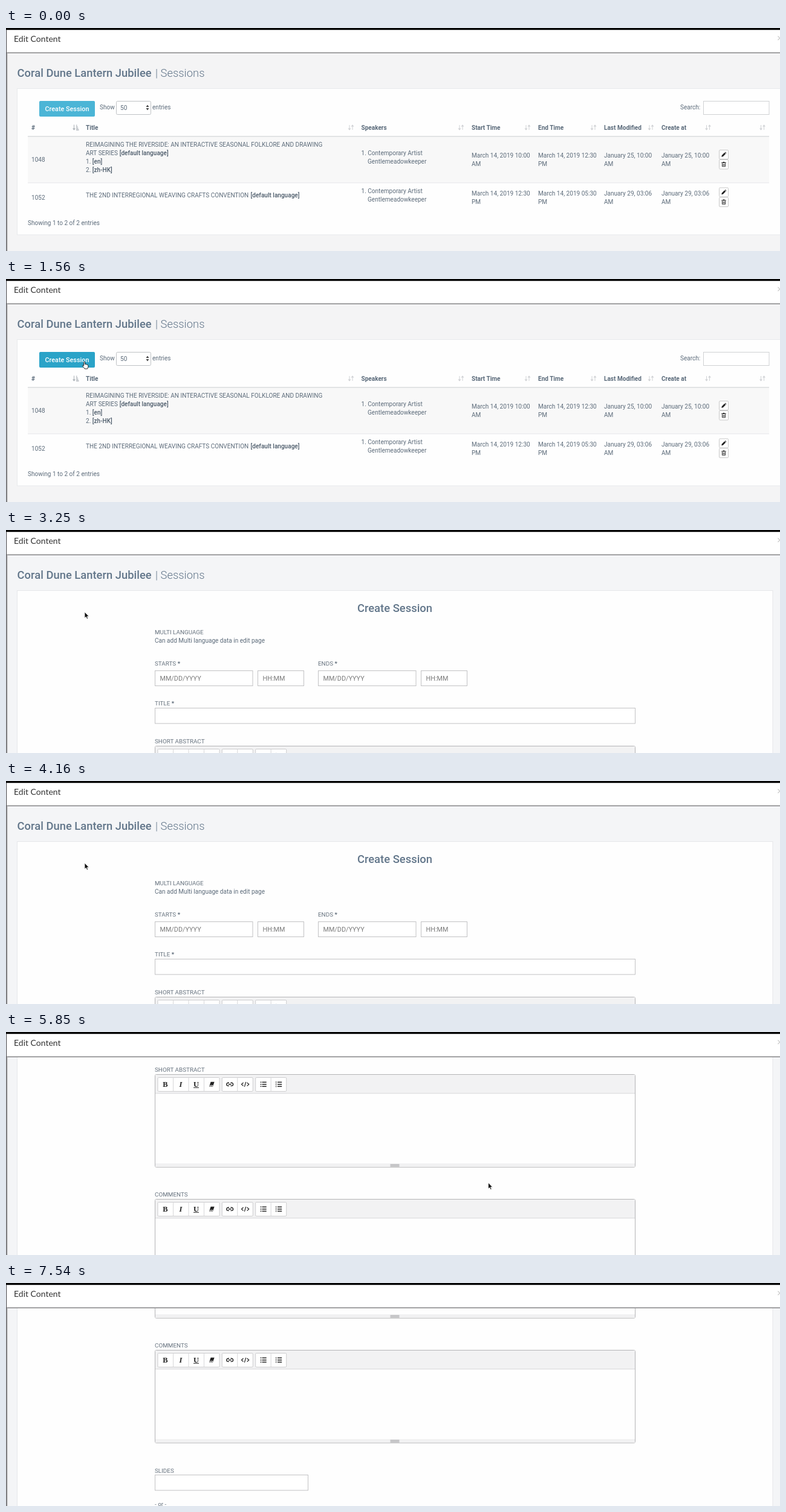
An HTML page for the animation above (8000 ms loop, 1280x370 px).

```html
<!DOCTYPE html>
<html lang="en">
<head>
<meta charset="utf-8">
<title>Sessions</title>
<style>
  html, body { margin: 0; width: 100%; height: 100%; overflow: hidden; background: #f4f4f5; }
  svg { display: block; width: 100%; height: 100%; }
  text { font: 10.05px Roboto, sans-serif; fill: #5c6b7a; white-space: pre; }
  .strong { font-weight: 500; fill: #4b5a69; }
  .head { font-weight: 700; fill: #5a6a7a; }
  .title { font-size: 18.4px; font-weight: 500; fill: #62768a; }
  .thin { font-weight: 300; }
  .label { font-size: 9.9px; fill: #66727e; }
  .hint { font-size: 10.8px; fill: #7a7a7a; }
  .button { font-size: 10.8px; font-weight: 500; fill: #fff; }
  .bar { font: 14px Lato, sans-serif; fill: #333; }
  .tool { font: bold 12.5px "Liberation Serif", serif; fill: #222; }
  .mid { text-anchor: middle; }
</style>
</head>
<body>
<svg viewBox="0 0 1280 370" preserveAspectRatio="none">
  <defs><clipPath id="view"><rect y="41" width="1280" height="329"/></clipPath></defs>
  <rect id="back" width="1280" height="370"/>
  <g clip-path="url(#view)">
    <g id="list"></g>
    <g id="form"></g>
  </g>
  <g id="frame"></g>
  <path id="arrow" d="M0 0V10.2L2.3 8.1L3.9 11.6L5.6 10.8L4.1 7.4H7.2Z" fill="#111" stroke="#fff" stroke-width=".8"/>
  <path id="hand" d="M2.6 1.2C2.8 -.3 4.4 -.3 4.6 1.2V4.6C5.2 3.9 6.3 4.1 6.5 4.9C7.2 4.4 8.1 4.7 8.3 5.5C9.2 5.2 9.9 5.8 9.9 6.7V8.6C9.9 10 9 10.6 8.8 12H4C3.6 10.6 1.4 8.8 .6 7.2C.3 6.2 1.5 5.6 2.6 7.2Z" fill="#fff" stroke="#111" stroke-width=".9"/>
</svg>
<script>
const $ = id => document.getElementById(id);

const text = (x, y, s, cls = "") => `<text x="${x}" y="${y}" class="${cls}">${s}</text>`;
const box = (x, y, x2, y2, fill, stroke = "none", r = 0) =>
  `<rect x="${x}" y="${y}" width="${x2 - x}" height="${y2 - y}" rx="${r}" fill="${fill}" stroke="${stroke}"/>`;
const path = (d, color, w = 1) => `<path d="${d}" fill="none" stroke="${color}" stroke-width="${w}"/>`;
const shape = (d, color) => `<path d="${d}" fill="${color}"/>`;
const at = (x, y, s) => `<g transform="translate(${x} ${y})">${s}</g>`;
const field = (x, y, x2, y2, hint = "") =>
  box(x + .5, y + .5, x2 - .5, y2 - .5, "#fff", "#c2c2c4") + text(x + 8.5, y + 16.7, hint, "hint");

const heading = () =>
  text(18.5, 80.5, "Coral Dune Lantern Jubilee", "title") + text(247, 80.5, "| Sessions", "title thin");

// Session list
const sortIcon = x => at(x, 165,
  path("M-2.5 -4V4M2.5 4V-4", "#d0d2d5") +
  shape("M-5 1.5H0L-2.5 4.8ZM0 -1.5H5L2.5 -4.8Z", "#d0d2d5"));

const sortedIcon = x => at(x, 165,
  path("M-2.5 -4.5V4", "#a9afb5") + shape("M-5 1.5H0L-2.5 4.8Z", "#a9afb5") +
  path("M1 -3.5H2.5M1 -1H3.5M1 1.5H4.5M1 4H5.5", "#a9afb5", 1.3));

const rowButtons = y =>
  box(1179.5, y + .5, 1194.5, y + 15.5, "#fff", "#c9c9c9", 1.5) +
  box(1179.5, y + 16.5, 1194.5, y + 32, "#fff", "#c9c9c9", 1.5) +
  at(1187, y + 8, shape("M-3.8 3.8L-3.2 1.2L1.2 -3.2L3.2 -1.2L-1.2 3.2ZM1.8 -3.8L2.6 -4.4L4.4 -2.6L3.8 -1.8Z", "#222")) +
  at(1187, y + 24.3,
    shape("M-3.8 -3.2H-1.4V-4.2H1.4V-3.2H3.8V-2.2H-3.8Z", "#222") +
    path("M-2.6 -2V3.5H2.6V-2M-.9 -1V2.5M.9 -1V2.5", "#222", .9));

const dates = (y, cells) => [770, 880, 989, 1084].map((x, i) =>
  text(x, y, cells[i][0]) + text(x, y + 14, cells[i][1])).join("");

const speaker = y => text(587.5, y, "1. Contemporary Artist") + text(598, y + 14, "Gentlemeadowkeeper");

const columns = [[42, "#"], [132, "Title"], [587.5, "Speakers"], [770, "Start Time"],
  [880, "End Time"], [989, "Last Modified"], [1084, "Create at"]];

$("list").innerHTML =
  heading() +
  box(18.5, 100.5, 1290, 343, "#fefefe", "#e8eaec") +
  `<rect id="create" x="55" y="121" width="92" height="26" rx="2"/>` +
  text(101, 138, "Create Session", "button mid") +
  text(155, 135, "Show") +
  box(182.5, 121.5, 239.5, 143.5, "#fff", "#bfc2c5", 2) + text(189, 136, "50") +
  shape("M231.5 131H236.5L234 127.6ZM231.5 133H236.5L234 136.4Z", "#444") +
  text(242, 135, "entries") +
  text(1115, 135, "Search:") + box(1153.5, 121.5, 1262, 143.5, "#fff", "#cfd1d3") +
  columns.map(([x, s]) => text(x, 169, s, "head")).join("") +
  sortedIcon(115) + [570.5, 752.5, 862.5, 971.5, 1066.5, 1161, 1251].map(sortIcon).join("") +
  box(36, 179, 1262, 257, "#f8f8f8") +
  box(36, 179, 1262, 180.6, "#dcdee0") + box(36, 256.4, 1262, 257.4, "#e6e7e9") +
  text(42, 222, "1048") +
  text(132, 197, "REIMAGINING THE RIVERSIDE: AN INTERACTIVE SEASONAL FOLKLORE AND DRAWING") +
  text(132, 211, "ART SERIES") + text(187.7, 211, "[default language]", "strong") +
  text(132, 225, `1. <tspan class="strong">[en]</tspan>`) +
  text(132, 239, `2. <tspan class="strong">[zh-HK]</tspan>`) +
  speaker(211) +
  dates(215, [["March 14, 2019 10:00", "AM"], ["March 14, 2019 12:30", "PM"],
    ["January 25, 10:00", "AM"], ["January 25, 10:00", "AM"]]) +
  rowButtons(202) +
  text(42, 285, "1052") +
  text(132, 281, "THE 2ND INTERREGIONAL WEAVING CRAFTS CONVENTION") +
  text(404.5, 281, "[default language]", "strong") +
  speaker(274) +
  dates(278, [["March 14, 2019 12:30", "PM"], ["March 14, 2019 05:30", "PM"],
    ["January 29, 03:06", "AM"], ["January 29, 03:06", "AM"]]) +
  rowButtons(264.5) +
  text(36, 327, "Showing 1 to 2 of 2 entries");

// Create form
const group = (x, n) => {
  let s = box(x, 5.5, x + n * 25.5, 28.5, "#fff", "#cdcdcf", 1.5);
  for (let i = 1; i < n; i++) s += path(`M${x + i * 25.5} 5.5V28.5`, "#d6d6d8");
  return s;
};

const listIcon = (x, numbered) => [-3.5, 0, 3.5].map(dy => {
  const y = 16.8 + dy;
  return path(`M${x - 2.2} ${y}H${x + 5}`, "#222", 1.5) +
    (numbered ? path(`M${x - 4.5} ${y - 1.4}V${y + 1.2}`, "#222", .9)
              : path(`M${x - 5} ${y}H${x - 3.4}`, "#222", 1.6));
}).join("");

const editor = y => at(0, y,
  box(246.5, .5, 1040.5, 154.3, "#fefefe", "#b4b4b6", 2) +
  box(247, 1, 1040, 32, "#f2f2f3") + box(247, 31.4, 1040, 32.3, "#d4d4d6") +
  group(251, 4) + group(357.3, 2) + group(412.7, 2) +
  text(263.5, 21, "B", "tool mid") +
  text(289, 21, `<tspan font-style="italic">I</tspan>`, "tool mid") +
  text(314.5, 20.5, "U", "tool mid") + path("M310 22.3H319", "#222") +
  shape("M338.6 12.8H344.6L342 20.8H336Z", "#222") +
  path("M337.6 18.6L336.9 20.2H341.4L342 18.6Z", "#fff", .8) +
  path("M369 14.2H367.4A2.6 2.6 0 0 0 367.4 19.4H369M371.4 14.2H373A2.6 2.6 0 0 1 373 19.4H371.4M367.8 16.8H372.6", "#222", 1.4) +
  path("M392.5 14L389.5 16.8L392.5 19.6M398.7 14L401.7 16.8L398.7 19.6M396.8 12.8L394.4 20.8", "#222", 1.2) +
  listIcon(425.7, false) + listIcon(451.2, true) +
  box(247, 148, 1040, 153.8, "#f1f1f2") + box(635.5, 149, 650.5, 153.8, "#c6c6c8"));

$("form").innerHTML =
  heading() +
  box(18.5, 100.5, 1268, 1200, "#fefefe", "#e6e7ea") +
  text(643, 136, "Create Session", "title mid") +
  text(246, 172.7, "MULTI LANGUAGE", "label") +
  text(246, 187, "Can add Multi language data in edit page") +
  [[246, "STARTS"], [516, "ENDS"]].map(([x, s]) =>
    text(x, 225, s + ` <tspan class="strong">*</tspan>`, "label") +
    field(x, 233, x + 162.5, 259, "MM/DD/YYYY") +
    field(x + 170, 233, x + 247, 259, "HH:MM")).join("") +
  text(246, 291.3, `TITLE <tspan class="strong">*</tspan>`, "label") +
  field(246, 295, 1041, 321.5) +
  text(246, 353.7, "SHORT ABSTRACT", "label") + editor(358) +
  text(246, 560.7, "COMMENTS", "label") + editor(565) +
  text(246, 768.5, "SLIDES", "label") + field(246, 772, 500, 798.5) +
  text(246, 824, "- or -", "label");

// Window chrome
$("frame").innerHTML =
  box(0, 0, 1280, 41, "#fff") + box(0, 0, 1280, 3.2, "#000") +
  box(0, 40.4, 1280, 42, "#8c8c8e") +
  box(0, 3, 1.2, 370, "#5a5a5e") + box(1.2, 41, 2.5, 370, "#a2a2a5") +
  text(13, 23.2, "Edit Content", "bar") +
  path("M1276.5 13.5L1283 20M1276.5 20L1283 13.5", "#c8c8c8", 1.2);

// Motion
const STEP = 130, LOOP = 8000;

const pointerKeys = [
  [520, 330, 16], [780, 262, 58], [1040, 188.5, 106], [1170, 150, 128], [1300, 131, 136],
  [1560, 127, 137], [3120, 127, 137], [3250, 130, 136], [4160, 130, 136],
  [4290, 420, 190], [4420, 757, 243], [4680, 757, 243], [4810, 797.5, 250]];

const scrollKeys = [
  [4940, 0], [5070, 31], [5200, 286], [5720, 286], [5850, 288], [6630, 288],
  [6760, 333], [6890, 398], [7280, 398], [7410, 440], [7540, 454]];

function track(keys, t) {
  const i = keys.findIndex(k => k[0] > t);
  if (i < 0) return keys[keys.length - 1].slice(1);
  if (i === 0) return keys[0].slice(1);
  const a = keys[i - 1], b = keys[i], f = (t - a[0]) / (b[0] - a[0]);
  return a.slice(1).map((v, j) => v + (b[j + 1] - v) * f);
}

const show = (el, on) => el.setAttribute("visibility", on ? "visible" : "hidden");
const move = (el, x, y) => el.setAttribute("transform", `translate(${x} ${y})`);

function draw(ms) {
  const t = Math.floor((ms % LOOP) / STEP) * STEP;
  const [x, y] = track(pointerKeys, t);
  const [scroll] = track(scrollKeys, t);
  const formOpen = t >= 3250;
  const hover = !formOpen && x < 147 && y > 121;

  show($("list"), !formOpen);
  show($("form"), formOpen);
  move($("form"), 0, -scroll);
  $("back").setAttribute("fill", formOpen ? "#f4f5f7" : "#f4f4f5");
  $("create").setAttribute("fill", hover ? "#2aa3c8" : "#4bb5d6");
  show($("arrow"), t >= 520 && t < 6890 && !hover);
  show($("hand"), hover);
  move($("arrow"), x, y);
  move($("hand"), x - 1, y);
}

const start = performance.now();
function tick() {
  draw(performance.now() - start);
  requestAnimationFrame(tick);
}
tick();
</script>
</body>
</html>
```
